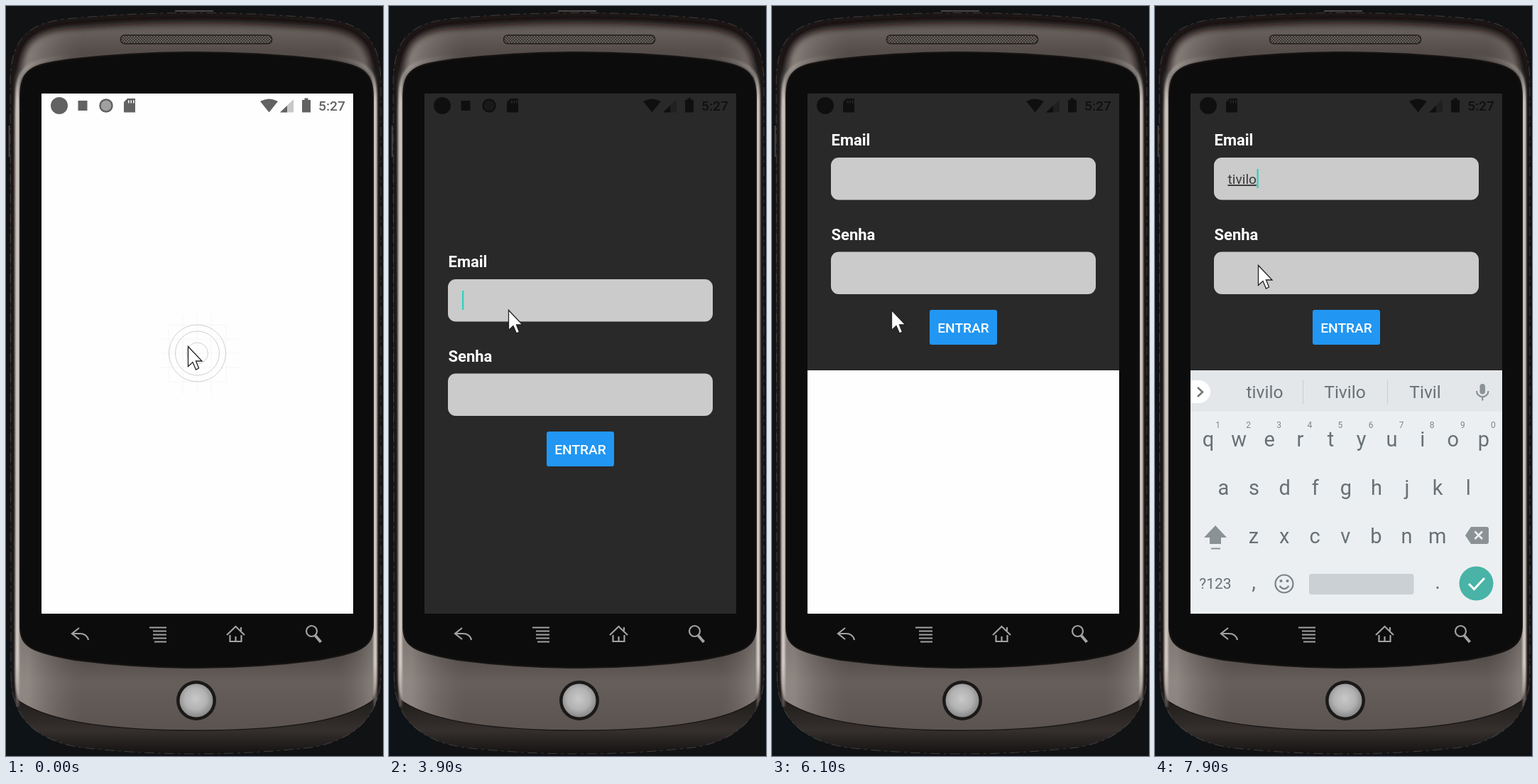
Recreate the animation shown at these times as an HTML page. Size 531 px wide and 1054 px high, loop 8 s.

```html
<!DOCTYPE html>
<html lang="pt">
<head>
<meta charset="utf-8">
<title>Login</title>
<style>
  html, body { margin: 0; width: 100%; height: 100%; overflow: hidden; background: #111214; }
  svg { display: block; width: 531px; height: 1054px; }
  text { font-family: Roboto, sans-serif; }
  .label { font-size: 22px; font-weight: 700; fill: #fff; }
  .caps { font-size: 19.2px; font-weight: 500; fill: #fff; text-anchor: middle; }
  .typed { font-size: 19.2px; fill: #3a3a3a; text-decoration: underline; }
  .kb { fill: #687176; text-anchor: middle; }
  .key { font-size: 29px; }
  .hint { font-size: 12px; fill: #7d868a; }
  .word { font-size: 24.6px; }
  .nav { fill: none; stroke: #a2a2a2; stroke-width: 2.2; }
</style>
</head>
<body>
<svg viewBox="0 0 531 1054">
  <defs>
    <path id="body" d="M6 110C6 50 26 25 85 18Q268 1 448 18C507 25 528 50 528 110V940C528 990 500 1030 430 1042Q268 1060 105 1042C30 1030 7 990 7 940Z"/>
    <clipPath id="bodyClip"><use href="#body"/></clipPath>
    <clipPath id="screenClip"><rect x="50" y="123" width="439" height="731"/></clipPath>
    <linearGradient id="metal" gradientUnits="userSpaceOnUse" x1="0" y1="8" x2="0" y2="1020">
      <stop offset="0" stop-color="#4a4440"/><stop offset=".028" stop-color="#655e59"/>
      <stop offset=".055" stop-color="#544d49"/><stop offset=".12" stop-color="#45403d"/>
      <stop offset=".88" stop-color="#4a4441"/><stop offset=".93" stop-color="#665e5a"/>
      <stop offset="1" stop-color="#5a5350"/>
    </linearGradient>
    <linearGradient id="sides" gradientUnits="userSpaceOnUse" x1="5" y1="0" x2="529" y2="0">
      <stop offset="0" stop-color="#b9b1ab" stop-opacity=".5"/><stop offset=".05" stop-color="#b9b1ab" stop-opacity=".5"/>
      <stop offset=".2" stop-color="#77706b" stop-opacity="0"/><stop offset=".88" stop-color="#77706b" stop-opacity="0"/>
      <stop offset=".97" stop-color="#b0a8a2" stop-opacity=".4"/><stop offset="1" stop-color="#b0a8a2" stop-opacity=".3"/>
    </linearGradient>
    <linearGradient id="shade" gradientUnits="userSpaceOnUse" x1="0" y1="20" x2="0" y2="150">
      <stop offset="0" stop-color="#12100f"/><stop offset=".5" stop-color="#12100f"/><stop offset="1" stop-color="#12100f" stop-opacity="0"/>
    </linearGradient>
    <linearGradient id="rim" gradientUnits="userSpaceOnUse" x1="0" y1="68" x2="0" y2="1000">
      <stop offset="0" stop-color="#cfc7c1" stop-opacity="0"/><stop offset=".07" stop-color="#cfc7c1"/>
      <stop offset=".92" stop-color="#d3cbc5"/><stop offset="1" stop-color="#cfc7c1" stop-opacity="0"/>
    </linearGradient>
    <linearGradient id="base" x1="0" y1="0" x2="0" y2="1">
      <stop offset="0" stop-color="#151312"/><stop offset=".6" stop-color="#35302e"/><stop offset="1" stop-color="#0b0a0a"/>
    </linearGradient>
    <radialGradient id="ball" cx=".48" cy=".45" r=".55">
      <stop offset="0" stop-color="#c8c8c8"/><stop offset=".6" stop-color="#b2b2b2"/><stop offset="1" stop-color="#888"/>
    </radialGradient>
    <pattern id="mesh" width="4" height="4" patternUnits="userSpaceOnUse">
      <rect width="4" height="4" fill="#66605c"/><path d="M0 0h2v2h-2zM2 2h2v2h-2z" fill="#3a3633"/>
    </pattern>
    <filter id="soft" filterUnits="userSpaceOnUse" x="0" y="0" width="531" height="1054"><feGaussianBlur stdDeviation="1.3"/></filter>
    <filter id="softer" filterUnits="userSpaceOnUse" x="-30" y="-30" width="591" height="1114"><feGaussianBlur stdDeviation="5"/></filter>
  </defs>

  <!-- phone -->
  <rect width="531" height="1054" fill="#111214"/>
  <rect y="890" width="60" height="164" fill="#0d1316"/>
  <path d="M238 7h54" stroke="#4a4643" stroke-width="2"/>
  <path d="M4.500 168v44" stroke="#55514e" stroke-width="1.500"/>
  <g clip-path="url(#bodyClip)">
    <use href="#body" fill="url(#metal)"/>
    <use href="#body" fill="url(#sides)"/>
    <use href="#body" fill="none" stroke="url(#shade)" stroke-width="26" filter="url(#softer)"/>
    <use href="#body" fill="none" stroke="#1a1715" stroke-width="11" filter="url(#soft)"/>
    <path d="M-4 955C25 1000 120 1018 268 1018S510 1000 536 955V1060H-4Z" fill="url(#base)" stroke="#1a1716" stroke-width="1.500"/>
    <path d="M16 985V125C16 84 32 78 90 69M520 985V125C520 84 504 78 446 69" fill="none" stroke="url(#rim)" stroke-width="5" filter="url(#soft)"/>
  </g>
  <use href="#body" fill="none" stroke="#8b8783" stroke-opacity=".35" stroke-dasharray="13 6 3 6"/>
  <path d="M20 130C20 88 34 83 90 75Q268 55 445 75C505 83 517 92 517 130V872C516 902 500 908 440 919Q268 941 97 919C35 908 20 900 20 872Z"
    fill="#0d0c0c" stroke="#171413" stroke-width="2"/>
  <rect x="161.500" y="41" width="213" height="12" rx="5.500" fill="url(#mesh)" stroke="#211e1d" stroke-width="1.500"/>
  <circle cx="268" cy="976" r="28" fill="#1b1918"/>
  <circle cx="268" cy="976" r="23.500" fill="url(#ball)"/>
  <g class="nav">
    <path d="M103 874L93 882L103 890M94 882H104Q114 882 116 891"/>
    <path d="M202 873.500H226M207 878.500H226M207 883.500H226M207 888.500H226M209 893.500H226"/>
    <path d="M311 884L323.500 872L336 884M315.500 884V893H331.500V884M331 878V873M323.500 892V886"/>
    <circle cx="430.500" cy="878.500" r="7.500"/><path d="M435 884L443.500 894" stroke-width="4"/>
  </g>

  <!-- screen -->
  <g clip-path="url(#screenClip)">
    <rect x="50" y="123" width="439" height="731" fill="#fefefe"/>
    <g id="splash" fill="none">
      <path d="M219 468H328M219 488H328M219 508H328M249 434V546M269 434V546M289 434V546M229 448H310V528H229Z" stroke="#f6f6f6"/>
      <g stroke="#cfcfcf" transform="translate(269.500 488)"><circle r="40"/><circle r="31"/><circle r="15"/></g>
    </g>
    <g id="login">
      <rect id="page" x="50" y="123" width="439" fill="#292929"/>
      <g id="form">
        <text class="label" x="83.500" y="366.500">Email</text>
        <rect x="83" y="384" width="373" height="59.500" rx="11" fill="#cbcbcb"/>
        <text class="label" x="83.500" y="499.500">Senha</text>
        <rect x="83" y="516.500" width="373" height="59.500" rx="11" fill="#cbcbcb"/>
        <rect x="222" y="598" width="95" height="49" rx="3" fill="#2196f3"/>
        <text class="caps" x="269.500" y="630">ENTRAR</text>
        <text class="typed" id="typed" x="102.500" y="421"></text>
        <rect id="caret" y="400" width="2.200" height="27" fill="#2fd0bb"/>
      </g>
    </g>
    <g opacity=".61">
      <circle id="app" cy="140" r="12"/>
      <rect id="square" y="133" width="13" height="14"/>
      <g id="ring"><circle cx="141" cy="140" r="8.500" fill-opacity=".6" stroke="#000" stroke-width="2.500"/></g>
      <path id="card" d="M-3 130H8V149.500H-8V135ZM-2 132.500V136.500H-.5V132.500ZM1.500 132.500V136.500H3V132.500ZM5 132.500V136.500H6.500V132.500Z" fill-rule="evenodd"/>
      <path d="M358 134Q370.500 127 383 134L370.500 149.500Z"/>
      <path d="M405 131V149.500H386Z" opacity=".35"/><path d="M396 140V149.500H386Z"/>
      <path d="M417 132H420.500V129.500H425.500V132H429V149.500H417Z"/>
      <text x="440" y="147" font-size="19.200" font-weight="500">5:27</text>
    </g>
    <g id="keyboard">
      <rect x="50" y="512" width="439" height="344" fill="#eceff1"/>
      <rect x="50" y="512" width="439" height="58" fill="#e4e7e9"/>
      <path d="M50 526H62A16 16 0 0 1 62 558H50Z" fill="#fff"/>
      <path d="M60 536L67 542.500L60 549" fill="none" stroke="#6b7478" stroke-width="2.400"/>
      <path d="M208.500 526V559M327.500 526V559" stroke="#c9cdd0"/>
      <g fill="#8a9296">
        <rect x="457.500" y="531" width="7.500" height="14.500" rx="3.750"/>
        <path d="M453 541a8.250 8.250 0 0 0 16.500 0M461.250 549v5.500" fill="none" stroke="#8a9296" stroke-width="2.200"/>
        <path d="M85 730L101 747H93V756H77V747H69Z"/><path d="M79 762.500H92" stroke="#8a9296" stroke-width="2"/>
        <path d="M445 732H467Q470 732 470 735V753Q470 756 467 756H445L437 744Z"/>
        <path d="M450.500 738.500L461 749M461 738.500L450.500 749" stroke="#eceff1" stroke-width="2.600"/>
      </g>
      <g fill="none" stroke="#7a8387" stroke-width="2.200">
        <circle cx="182" cy="812" r="12.500"/><path d="M175.500 815Q182 823 188.500 815"/>
      </g>
      <g fill="#7a8387"><circle cx="177.500" cy="808" r="2"/><circle cx="186.500" cy="808" r="2"/></g>
      <rect x="217" y="798" width="147.500" height="29" rx="3.500" fill="#cad0d3"/>
      <circle cx="452.500" cy="811.500" r="24" fill="#48b3a6"/>
      <path d="M442 812L449.500 819.500L464 804" fill="none" stroke="#fff" stroke-width="3"/>
    </g>
  </g>
  <path id="mouse" d="M.5 .5V28.500L7 22.500L11.500 33L15.500 31L11.500 21H20Z" fill="#fff" stroke="#222" stroke-width="1.300"/>
</svg>
<script>
const $ = id => document.getElementById(id);
const LOOP = 8000, NAME = "tivilo";
const keyTimes = [6300, 6400, 6600, 6800, 7000, 7300];
const caretOn = [[3900, 4400], [4900, 5900], [6300, 7400], [7900, 8000]];
const path = [[0, 256, 478], [2400, 256, 478], [3200, 253, 612], [3300, 205, 515],
  [3400, 168, 427], [7800, 168, 427], [7900, 145, 364], [8000, 145, 364]];

function set(el, attrs) {
  for (const k in attrs) el.setAttribute(k, attrs[k]);
}

function label(str, x, y, cls) {
  const el = document.createElementNS("http://www.w3.org/2000/svg", "text");
  set(el, { class: "kb " + cls, x, y });
  el.textContent = str;
  $("keyboard").append(el);
  return el;
}

function show(id, on) {
  $(id).style.display = on ? "" : "none";
}

const move = (id, x, y) => set($(id), { transform: `translate(${x} ${y})` });

[["qwertyuiop", 75, 619], ["asdfghjkl", 96.5, 687], ["zxcvbnm", 139, 755]].forEach(([row, x, y]) =>
  [...row].forEach((c, i) => label(c, x + 43.1 * i, y, "key")));
[..."1234567890"].forEach((c, i) => label(c, 88.5 + 43.1 * i, 593, "hint"));
set(label("?123", 85, 819, ""), { "font-size": 21 });
label(",", 139, 819, "key");
label(".", 398, 819, "key");
const words = [154.5, 267.5, 380.5].map(x => label("", x, 551, "word"));

function mouseAt(t) {
  const i = path.findIndex(p => p[0] > t);
  const [t0, x0, y0] = path[i - 1], [t1, x1, y1] = path[i];
  const p = (t - t0) / (t1 - t0);
  return [x0 + (x1 - x0) * p, y0 + (y1 - y0) * p];
}

function suggestions(t) {
  if (t < 6700) return ["I'm", "I", "We"];
  const cap = "T" + NAME.slice(1), stem = NAME.slice(0, 5), capStem = cap.slice(0, 5);
  return t < 7900 ? [stem, capStem, cap] : [NAME, cap, capStem];
}

function draw(t) {
  const raised = t >= 5400, fewIcons = t >= 5600, swapped = t >= 5200 && !fewIcons;
  show("splash", t < 2400);
  show("login", t >= 2400);
  set($("page"), { height: raised ? 389 : 731 });
  move("form", 0, raised ? -171 : 0);

  $("typed").textContent = NAME.slice(0, keyTimes.filter(k => k <= t).length);
  set($("caret"), { x: 103 + $("typed").getComputedTextLength() });
  show("caret", caretOn.some(([a, b]) => t >= a && t < b));

  set($("app"), { cx: swapped ? 108 : 75 });
  set($("square"), { x: swapped ? 68.5 : 101.5 });
  show("square", !fewIcons);
  show("ring", !fewIcons);
  move("card", fewIcons ? 108 : 174, 0);

  // keyboard slides up and fades in, slowing down
  const left = (1 - Math.min(1, Math.max(0, (t - 6200) / 400))) ** 2;
  show("keyboard", left < 1);
  move("keyboard", 0, 108 * left);
  $("keyboard").style.opacity = 1 - left;
  suggestions(t).forEach((w, i) => words[i].textContent = w);

  move("mouse", ...mouseAt(t));
}

const start = performance.now();
function tick() {
  // the screen updates in 100 ms steps
  draw(Math.floor((performance.now() - start) % LOOP / 100) * 100);
  requestAnimationFrame(tick);
}
tick();
</script>
</body>
</html>
```
